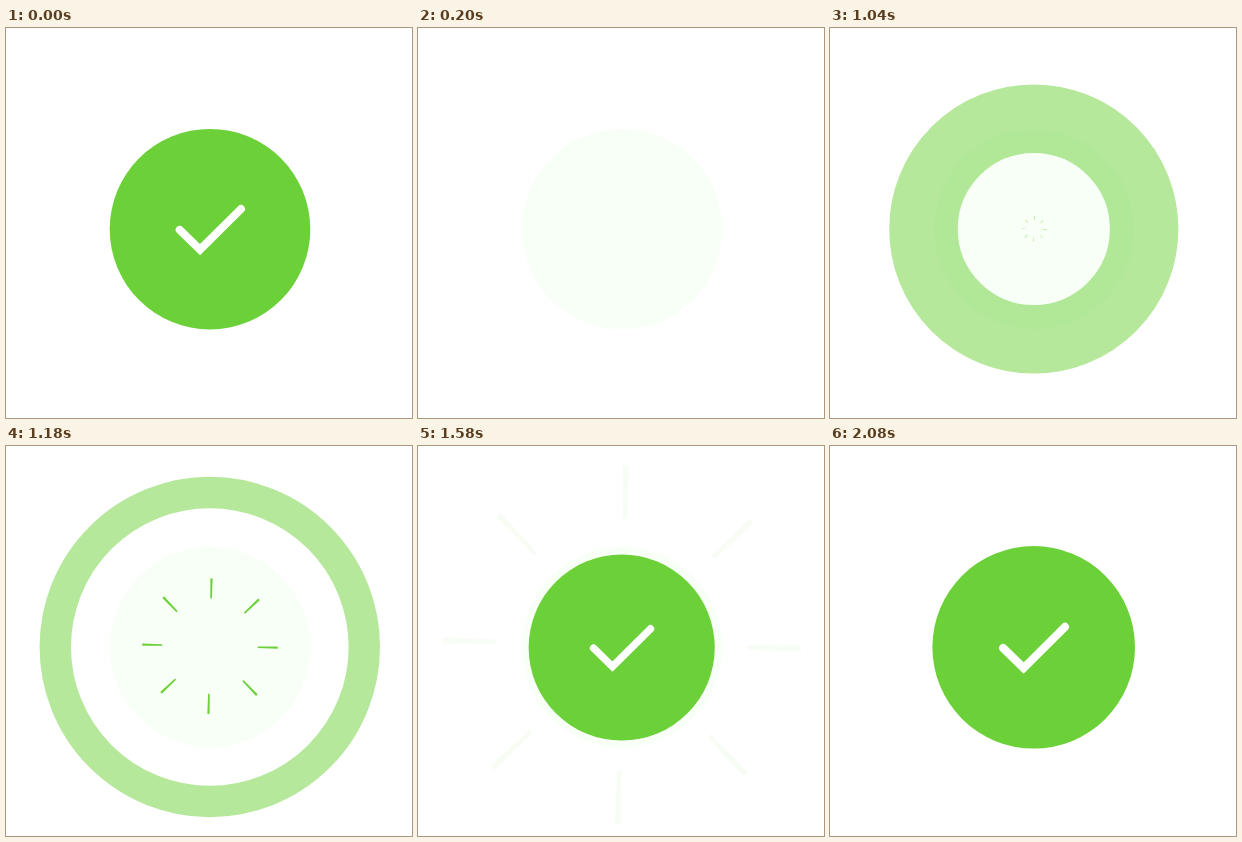
An HTML page for the animation above (3600 ms loop, 406 by 390 pixels).

```html
<!DOCTYPE html>
<html lang="en">
<head>
<meta charset="utf-8">
<title>Success burst</title>
<style>
  html, body { margin: 0; width: 100%; height: 100%; overflow: hidden; background: #fff; }
  svg { display: block; width: 100%; height: 100%; }
</style>
</head>
<body>
<svg viewBox="0 0 406 390">
  <circle id="pale" cx="204" cy="201.2" r="100.3" fill="#f8fff7"/>
  <circle id="ring" cx="203.8" cy="201" fill="none" stroke="#6cd139" stroke-opacity=".5"/>
  <g id="rays" fill="#6cd139"></g>
  <circle id="halo" cx="203.8" cy="201.1" fill="#6cd139"/>
  <g id="badge">
    <circle r="100.3" fill="#6cd139"/>
    <path d="M-30.3 .7 L-10 20.5 L31 -20.2" fill="none" stroke="#fff" stroke-width="8" stroke-linecap="round"/>
  </g>
</svg>
<script>
const LOOP = 3600;
const [ring, rays, halo, badge] = ['ring', 'rays', 'halo', 'badge'].map(id => document.getElementById(id));

const progress = (t, start, length) => Math.min(1, Math.max(0, (t - start) / length));
const quadOut = p => 1 - (1 - p) ** 2;
const cubicOut = p => 1 - (1 - p) ** 3;
const cubicInOut = p => p < 0.5 ? 4 * p ** 3 : 1 - 4 * (1 - p) ** 3;

function set(el, attrs) {
  for (const name in attrs) el.setAttribute(name, attrs[name]);
}

for (let i = 0; i < 8; i++) {
  const ray = document.createElementNS('http://www.w3.org/2000/svg', 'path');
  set(ray, { d: 'M126-2.1L179-3V3L126 2.1Z', transform: `rotate(${i * 45 + 1.3})` });
  rays.append(ray);
}

function drawRing(t) {
  const e = cubicOut(progress(t, 866, 625));
  const visible = t > 866 && e < 1;
  set(ring, { r: 176 * e, 'stroke-width': 293 * e * (1 - e), opacity: visible ? 1 : 0 });
}

function drawRays(t) {
  const scale = Math.max(0.012, cubicInOut(progress(t, 857, 711)));
  const opacity = t < 840 ? 0 : 1 - progress(t, 1420, 170);
  set(rays, { transform: `translate(204 ${201.1 - 2.6 * scale}) scale(${scale})`, opacity });
}

function drawHalo(t) {
  const e = cubicOut(progress(t, 1680, 400));
  set(halo, { r: 101 + 78.5 * e, opacity: t < 1680 ? 0 : 1 - e });
}

function drawBadge(t) {
  if (t < 840) {
    set(badge, { transform: 'translate(204 201.2)', opacity: t < 20 ? 1 : 1 - progress(t, 10, 190) });
    return;
  }
  const e = quadOut(progress(t, 1338, 340));
  const y = 204.4 - 3.1 * e;
  set(badge, { transform: `translate(203.7 ${y}) scale(${1.01 * e})`, opacity: Math.min(1, 1.5 * e) });
}

function draw(t) {
  drawRing(t);
  drawRays(t);
  drawHalo(t);
  drawBadge(t);
}

const begin = performance.now();
function tick() {
  draw((performance.now() - begin) % LOOP);
  requestAnimationFrame(tick);
}
tick();
</script>
</body>
</html>
```
